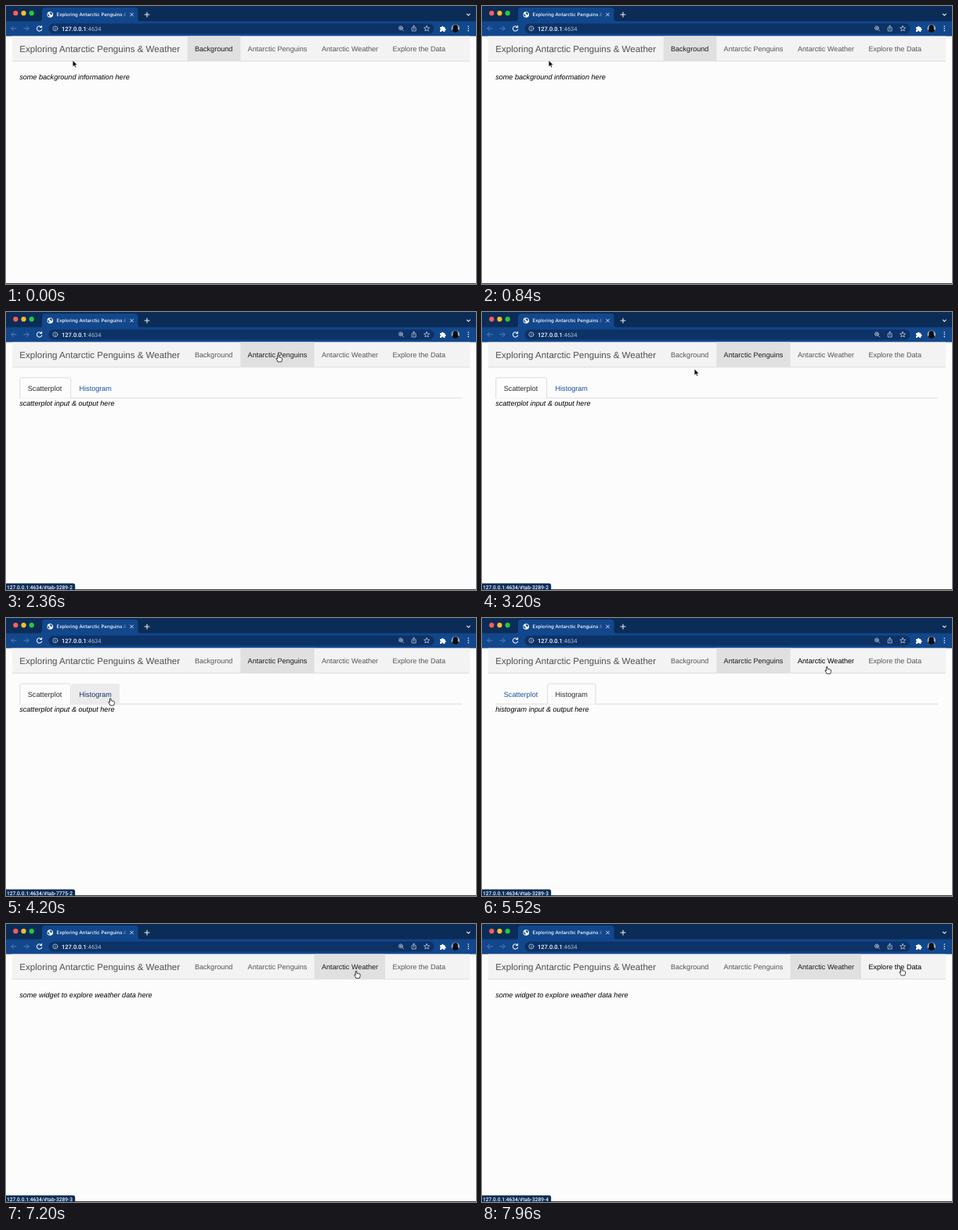
An HTML page for the animation above (8000 ms loop, 600 by 356 pixels).

```html
<!DOCTYPE html>
<html lang="en">
<head>
<meta charset="utf-8">
<title>Exploring Antarctic Penguins &amp; Weather</title>
<style>
  html, body { margin: 0; width: 100%; height: 100%; overflow: hidden; background: #fcfcfc; }
  svg { display: block; width: 600px; height: 356px; }
  text { font: 9.1px "Liberation Sans", Arial, sans-serif; text-rendering: geometricPrecision; white-space: pre; }
  .brand { font-size: 11.57px; fill: #505050; }
  .note { font-size: 9.1px; font-style: italic; fill: #000; }
  .tabname { font: 500 6.08px Inter, sans-serif; fill: #fff; }
  .url { font: 500 7.5px Roboto, sans-serif; fill: #fff; }
  .status { font: 500 6.6px Roboto, sans-serif; fill: #fff; }
  .icon { fill: none; stroke: #e6edf6; stroke-width: .9; stroke-linecap: round; stroke-linejoin: round; }
  .thin { stroke-width: .65; }
</style>
</head>
<body>
<svg viewBox="0 0 600 356">
  <defs>
    <linearGradient id="fade">
      <stop offset="0" stop-color="#12478c" stop-opacity="0"/>
      <stop offset="1" stop-color="#12478c"/>
    </linearGradient>
    <clipPath id="face"><circle cx="573.8" cy="28.8" r="5.2"/></clipPath>
  </defs>
  <rect width="600" height="356" fill="#fcfcfc"/>

  <!-- browser window -->
  <rect width="600" height="21" fill="#0b2c56"/>
  <rect y="19.500" width="600" height="19.100" fill="#12478c"/>
  <path d="M42 20Q46 20 46 16V6Q46 2 50 2H164.500Q168.500 2 168.500 6V16Q168.500 20 172.500 20Z" fill="#12478c"/>
  <circle cx="12.300" cy="9.200" r="3.100" fill="#ff5f57"/>
  <circle cx="22.500" cy="9.200" r="3.100" fill="#febc2e"/>
  <circle cx="32.700" cy="9.200" r="3.100" fill="#28c840"/>
  <circle cx="56.300" cy="11" r="3.800" fill="#f4f7fb"/>
  <path d="M53.300 10L55.200 11.200 55.600 13.800Q53 13.200 53.300 10ZM56.200 8.200L58.500 8.600 58.800 11 57.200 11.600 56.900 10.200 55.600 9.600Z" fill="#12478c"/>
  <text class="tabname" x="64.500" y="13.200">Exploring Antarctic Penguins &amp;</text>
  <rect x="147" y="4" width="7" height="14" fill="url(#fade)"/>
  <rect x="154" y="4" width="4" height="14" fill="#12478c"/>
  <g class="icon">
    <path d="M158.600 9.100L162.400 12.900M162.400 9.100L158.600 12.900"/>
    <path d="M177 11H183M180 8V14" stroke-width="1.100"/>
    <path d="M588.300 10.200L590.300 12.200 592.300 10.200" stroke-width="1.100"/>
    <path d="M13 28.800H7M9.600 26L6.800 28.800 9.600 31.600M23 28.800H29M26.400 26L29.200 28.800 26.400 31.600" style="stroke:#5f86b8"/>
    <path d="M45.200 27A3.200 3.200 0 1 0 45.700 29.800M45.600 25.300V27.400H43.500" stroke-width="1.100"/>
  </g>
  <rect x="54.500" y="22.600" width="492" height="13" rx="6.500" fill="#0c3266"/>
  <g class="icon thin">
    <circle cx="62.900" cy="28.800" r="3"/>
    <path d="M62.900 28.600V30.400M62.900 27.100V27.200"/>
    <circle cx="503.900" cy="28.200" r="2.400"/>
    <path d="M505.700 30L507.600 31.900M502.900 28.200H504.900M503.900 27.200V29.200"/>
    <path d="M519.200 27.700H518.200V32H523.200V27.700H522.200M520.700 30V25.200M519.300 26.500L520.700 25.100 522.100 26.500"/>
    <path d="M537.100 25.400L538.100 27.700 540.600 27.900 538.700 29.500 539.300 32 537.100 30.700 534.900 32 535.500 29.500 533.600 27.900 536.100 27.700Z"/>
  </g>
  <text class="url" x="71" y="31.500">127.0.0.1<tspan fill="#a9bdd6" font-weight="400">:4634</tspan></text>
  <path d="M554 27H556A1.300 1.300 0 1 1 558.600 27H560.300V28.700A1.300 1.300 0 1 1 560.300 31.300V33H558.400A1.200 1.200 0 0 0 556 33H554V31A1.200 1.200 0 0 0 554 28.700Z" fill="#fff"/>
  <g clip-path="url(#face)">
    <rect x="568" y="23" width="12" height="12" fill="#9fb4c6"/>
    <path d="M568.500 35Q569 31 570.500 29.500V27Q570.800 24 573.800 24T576.800 27V29.500Q578.600 31 579 35Z" fill="#0d0e14"/>
  </g>
  <g fill="#fff">
    <circle cx="590.300" cy="26" r=".8"/><circle cx="590.300" cy="28.800" r=".8"/><circle cx="590.300" cy="31.600" r=".8"/>
  </g>

  <!-- page -->
  <rect x="8" y="38.600" width="584" height="32.400" fill="#f3f3f3"/>
  <rect x="8" y="70.200" width="584" height=".9" fill="#dcdcdc"/>
  <text class="brand" x="17.300" y="58.700">Exploring Antarctic Penguins &amp; Weather</text>
  <g id="nav"></g>
  <g id="subs"><rect x="17.500" y="109.600" width="565" height="1" fill="#dcdcdc"/></g>
  <text id="note" class="note" x="17.200"></text>
  <rect y="355" width="600" height="1" fill="#3c3e42"/>
  <g id="status">
    <path d="M0 347.400H85.700Q88.200 347.400 88.200 349.900V356H0Z" fill="#0b2c56"/>
    <text class="status" x="1" y="354.900"></text>
  </g>

  <g id="cursor">
    <path id="arrow" d="M0 0V8L1.900 6.300 3.100 9 4.400 8.500 3.200 5.800H5.800Z" fill="#000" stroke="#fff" stroke-width=".5"/>
    <path id="hand" d="M-1 .8C-1-.3 .6-.3 .6 .8V3.200C.8 2.700 2.100 2.800 2.100 3.600 2.400 3 3.600 3.200 3.600 4 4 3.600 4.900 3.800 4.900 4.700V6.400C4.900 7.400 4.200 8 4.100 9.200H-.5C-.8 7.800-1.800 6.800-2.500 5.600-3 4.700-2 4-1.400 4.900L-1 5.400Z" fill="#fff" stroke="#000" stroke-width=".75" stroke-linejoin="round"/>
  </g>
</svg>
<script>
const LOOP = 8000;
const $ = id => document.getElementById(id);

function add(parent, tag, attrs, text = '') {
  const el = document.createElementNS('http://www.w3.org/2000/svg', tag);
  for (const k in attrs) el.setAttribute(k, attrs[k]);
  el.textContent = text;
  return parent.appendChild(el);
}

// label, left edge, right edge, text start
const nav = [
  ['Background', 231.7, 299.4, 240.9],
  ['Antarctic Penguins', 299.4, 393.6, 308.6],
  ['Antarctic Weather', 393.6, 484, 403],
  ['Explore the Data', 484, 569.5, 493.4]
].map(([label, x0, x1, tx], i) => ({
  x0, x1, y0: 38, y1: 70, link: `3289-${i + 1}`,
  box: add($('nav'), 'rect', { x: x0, y: 38.6, width: x1 - x0, height: 31.8, fill: '#e0e0e0' }),
  text: add($('nav'), 'text', { x: tx, y: 58.1 }, label)
}));

const subs = [['Scatterplot', 17.8, 82.6, 27.8], ['Histogram', 83.6, 145, 93.5]].map(([label, x0, x1, tx], i) => ({
  x0, x1, y0: 84, y1: 110, link: `7775-${i + 1}`,
  box: add($('subs'), 'path', { d: `M${x0} 110.600V86.500Q${x0} 84 ${x0 + 2.5} 84H${x1 - 2.5}Q${x1} 84 ${x1} 86.500V110.600` }),
  text: add($('subs'), 'text', { x: tx, y: 101 }, label)
}));

const ease = {
  line: u => u,
  in: u => u * u,
  out: u => 1 - (1 - u) ** 2,
  both: u => u * u * (3 - 2 * u)
};

// start, end, target, easing, optional control point
const moves = [
  [1000, 1580, [347.6, 54.7], 'both', [210, 60]],
  [2900, 3100, [300.4, 72], 'in'],
  [3100, 3440, [147, 99], 'line', [262.9, 68.8]],
  [3440, 3600, [133.5, 102.8], 'out'],
  [4900, 5320, [440.6, 62.2], 'both', [300, 95]],
  [5520, 6440, [444.6, 60.2], 'both'],
  [7150, 7650, [535.6, 56.7], 'both']
];

function pointer(t) {
  let p = [85.2, 69.8];
  for (const [t0, t1, end, kind, mid] of moves) {
    if (t < t0) break;
    const s = ease[kind](Math.min(1, (t - t0) / (t1 - t0)));
    p = p.map((a, i) => {
      const m = mid ? mid[i] : (a + end[i]) / 2;
      return (1 - s) ** 2 * a + 2 * s * (1 - s) * m + s * s * end[i];
    });
  }
  return p;
}

const pageAt = t => t < 2150 ? 0 : t < 6640 ? 1 : 2;
const subAt = t => t < 4500 ? 0 : 1;

function hovered(t) {
  const [x, y] = pointer(t);
  const targets = pageAt(t) === 1 ? [...nav, ...subs] : nav;
  return targets.find(r => x >= r.x0 && x < r.x1 && y >= r.y0 && y < r.y1);
}

// The status line keeps the most recently hovered link.
function lastLink(t) {
  for (; t > 0; t -= 20) {
    const hit = hovered(t);
    if (hit) return hit.link;
  }
  return '';
}

const show = (el, on) => el.setAttribute('visibility', on ? 'visible' : 'hidden');

function draw(t) {
  const page = pageAt(t), sub = subAt(t), hit = hovered(t), [x, y] = pointer(t);

  nav.forEach((n, i) => {
    show(n.box, i === page);
    n.text.setAttribute('fill', i === page ? '#1a1a1a' : n === hit ? '#000' : '#555');
  });

  $('subs').style.display = page === 1 ? '' : 'none';
  subs.forEach((s, i) => {
    const active = i === sub;
    s.box.setAttribute('fill', active ? '#fcfcfc' : s === hit ? '#ebebeb' : 'none');
    s.box.setAttribute('stroke', active ? '#dcdcdc' : 'none');
    s.text.setAttribute('fill', active ? '#2a2a2a' : s === hit ? '#12346a' : '#164fa0');
  });

  $('note').textContent = page === 0 ? 'some background information here'
    : page === 2 ? 'some widget to explore weather data here'
    : `${sub ? 'histogram' : 'scatterplot'} input & output here`;
  $('note').setAttribute('y', page === 1 ? 120.2 : 93.7);

  $('status').setAttribute('opacity', Math.max(0, Math.min(1, (t - 1600) / 160)));
  $('status').lastElementChild.textContent = `127.0.0.1:4634/#tab-${lastLink(t)}`;

  $('cursor').setAttribute('transform', `translate(${x} ${y})`);
  show($('arrow'), !hit);
  show($('hand'), hit);
}

const start = performance.now();
function tick() {
  draw((performance.now() - start) % LOOP);
  requestAnimationFrame(tick);
}
tick();
</script>
</body>
</html>
```
